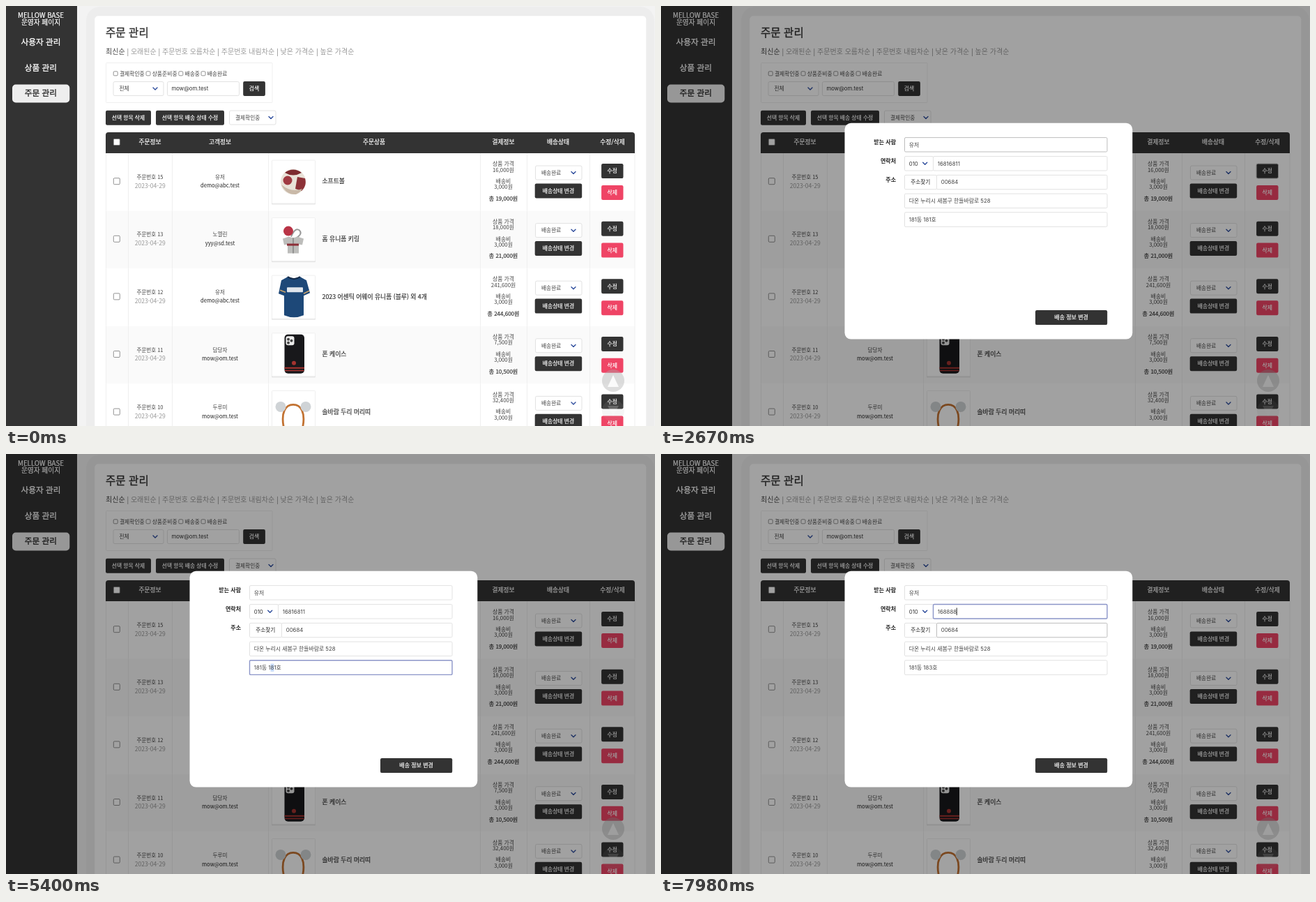
An HTML page that plays this animation: 931x602 px, repeating every 8 s.

```html
<!DOCTYPE html>
<html lang="ko">
<head>
<meta charset="utf-8">
<title>주문 관리</title>
<style>
html, body { margin: 0; width: 100%; height: 100%; overflow: hidden; background: #f3f3f3; }
svg { display: block; width: 931px; height: 602px; }
text { font-family: 'Noto Sans CJK KR', 'Noto Sans CJK', 'Noto Sans', sans-serif; white-space: pre; }
.ui { font-family: Inter, 'Noto Sans CJK KR', 'Noto Sans CJK', sans-serif; }
</style>
</head>
<body>
<svg id="stage" viewBox="0 0 931 602" xmlns="http://www.w3.org/2000/svg"></svg>
<script>
const DARK = '#333', LOOP = 8000;

// Markup helpers
const rect = (x, y, w, h, fill, r = 0, more = '') =>
  `<rect x="${x}" y="${y}" width="${w}" height="${h}" rx="${r}" fill="${fill}" ${more}/>`;
const line = c => `stroke="${c}" stroke-width="1"`;
const circle = (x, y, r, fill, more = '') =>
  `<circle cx="${x}" cy="${y}" r="${r}" fill="${fill}" ${more}/>`;
const path = (d, fill, more = '') => `<path d="${d}" fill="${fill}" ${more}/>`;
const group = (x, y, body, more = '') => `<g transform="translate(${x} ${y})" ${more}>${body}</g>`;

function text(x, y, size, str, { color = '#444', anchor = 'start', medium, bold, ui, id } = {}) {
  const weight = medium ? `stroke="${color}" stroke-width="${size * 0.024}"` : '';
  return `<text x="${x}" y="${y}" font-size="${size}" fill="${color}" text-anchor="${anchor}" ${weight}` +
    `${bold ? ' font-weight="700"' : ''}${ui ? ' class="ui"' : ''}${id ? ` id="${id}"` : ''}>${str}</text>`;
}
const mid = (x, y, size, str, opt = {}) => text(x, y, size, str, { anchor: 'middle', ...opt });
const chevron = (x, y) =>
  path(`M${x - 3} ${y - 1.4}l3 3l3 -3`, 'none', 'stroke="#2d4c9c" stroke-width="1.4" stroke-linecap="round" stroke-linejoin="round"');
const button = (x, y, w, str, { h = 21, size = 7.8, fill = DARK, id = '' } = {}) =>
  `<g id="${id}">` + rect(x, y, w, h, fill, 2.2) +
  mid(x + w / 2, y + h / 2 + 2.8, size, str, { color: '#fff', medium: true }) + '</g>';
const select = (x, y, w, str, { id = '', inset = 12 } = {}) =>
  rect(x, y, w, 20, '#fff', 2, line('#e2e2e2') + ` id="${id}"`) +
  text(x + 8.5, y + 12.8, 7.7, str) + chevron(x + w - inset, y + 10);
const check = (x, y, s) => rect(x - s / 2, y - s / 2, s, s, '#fff', 1.3, 'stroke="#777" stroke-width=".8"');

// Product pictures, drawn around their own centre
const pictures = [
  () => circle(0, 0, 18, '#e9e2d8') +
    path('M-12 -13a18 18 0 0 1 24 0q-12 7 -24 0z', '#7d2c30') +
    path('M6 -7l11 2a18 18 0 0 1 -5 18l-9 -3z', '#8d3238') +
    path('M-17 4q14 12 30 6a18 18 0 0 1 -9 8q-14 1 -21 -14z', '#c9b9a8') +
    circle(-8, -2, 6.5, '#a03a42'),
  () => path('M-3 -4q6 -14 12 -9q5 5 -5 11', 'none', 'stroke="#999" stroke-width="2"') +
    path('M-15 -1l9 -3q6 3 12 0l9 3l-2 9l-5 -1v13h-16v-13l-5 1z', '#bdbdbb') +
    path('M0 -2v22', 'none', 'stroke="#555" stroke-width=".8"') +
    rect(-9, 6, 17, 3, '#8d2f38') + circle(-7, -12, 7, '#b93446'),
  () => path('M-8 -29q9 4 18 0l9 5l5 18l-9 4v28q-14 6 -28 0v-28l-8 -3l4 -19z', '#1d4878') +
    path('M-8 -29q9 6 18 0', 'none', 'stroke="#142a48" stroke-width="2"') +
    path('M-19 -10l8 3M23 -9l-8 4', 'none', 'stroke="#c9a36c" stroke-width="1.6"') +
    rect(-9, -14, 23, 7, '#dfe5ec', 1),
  () => rect(-12.5, -29, 28.5, 56, '#18181b', 5) + rect(-10.5, -26.5, 12, 13, '#ececec', 3) +
    circle(-7, -22, 2, '#444') + circle(-7, -17, 2, '#444') + circle(-2.5, -20, 2, '#444') +
    rect(-12.5, 18, 28.5, 2, '#a5332f') + rect(-12, 22, 27.5, 1.5, '#a5332f') + circle(1, 12, 3, '#a5332f'),
  () => path('M-13.5 22C-18 0 -11 -11 0 -11S18 0 13.5 22', 'none', 'stroke="#c27232" stroke-width="2.8"') +
    circle(-18, -8, 7.5, '#cfd3d6') + circle(18, -8, 7.5, '#cfd3d6'),
];

const orders = [
  [15, '유저', 'demo@abc.test', '소프트볼', '16,000', '19,000'],
  [13, '노엘린', 'yyy@sd.test', '홈 유니폼 키링', '18,000', '21,000'],
  [12, '유저', 'demo@abc.test', '2023 어센틱 어웨이 유니폼 (블루) 외 4개', '241,600', '244,600'],
  [11, '담당자', 'mow@om.test', '폰 케이스', '7,500', '10,500'],
  [10, '두루미', 'mow@om.test', '솔바람 두리 머리띠', '32,400', '35,400'],
];

function row([no, user, mail, item, price, total], i) {
  const c = { color: '#444' }, d = { color: '#222' };
  return group(0, i * 82.6,
    rect(143, 211, 759, 82.6, i % 2 ? '#fafafa' : '#fff') +
    [143.5, 175.5, 238.5, 376.5, 680.5, 747.5, 837.5, 902].map(x => rect(x - 0.5, 211, 1, 82.6, '#efefef')).join('') +
    check(158.8, 251.2, 9) +
    mid(206.5, 247.9, 7.5, '주문번호 ' + no, c) + mid(206.8, 260.5, 8.6, '2023-04-29', { color: '#999' }) +
    mid(307, 247.9, 7.6, user, c) + mid(307, 260.2, 7.6, mail, d) +
    rect(381, 222.2, 63, 62.4, '#e3e3e3', 1) + rect(381.5, 221, 62, 62, '#fff', 1, line('#efefef')) +
    group(412, 252, pictures[i]()) +
    text(453.5, 254.4, 8.8, item, { color: DARK, medium: true }) +
    mid(713.5, 229.3, 7.8, '상품 가격', c) + mid(713.5, 237.6, 7.8, price + '원', c) +
    mid(713.5, 254, 7.8, '배송비', c) + mid(713.5, 262.3, 7.8, '3,000원', c) +
    mid(713.5, 278.8, 8, `총 ${total}원`, { color: DARK, medium: true }) +
    select(759.5, 229, 66.5, '배송완료', { id: 'status' + i }) + button(758.7, 254.4, 67.5, '배송상태 변경') +
    button(854.1, 226.1, 31.4, '수정', { id: 'edit' + i }) +
    button(854.1, 257, 31.4, '삭제', { fill: '#ef4465' }));
}

const sidebar = () => rect(0, 0, 102, 602, DARK) +
  mid(50, 17.2, 9.7, 'MELLOW BASE', { color: '#fff', medium: true }) +
  mid(50, 27.4, 9.7, '운영자 페이지', { color: '#fff', medium: true }) +
  mid(50, 56.2, 11.7, '사용자 관리', { color: '#fff', medium: true }) +
  mid(50, 92.5, 11.7, '상품 관리', { color: '#fff', medium: true }) +
  rect(9, 112.5, 82.3, 26, '#eee', 5) +
  mid(50, 128.8, 11.7, '주문 관리', { color: '#222', medium: true });

const sorts = ['오래된순', '주문번호 오름차순', '주문번호 내림차순', '낮은 가격순', '높은 가격순'];
const filters = [[157.2, '결제확인중'], [204, '상품준비중'], [250.8, '배송중'], [283, '배송완료']];
const heads = [[206.5, '주문정보'], [307, '고객정보'], [528, '주문상품'], [713.5, '결제정보'], [792, '배송상태'], [870, '수정/삭제']];

const page = () => rect(115, 1, 815, 640, '#ededed', 20) + rect(127.3, 14.3, 791, 620, '#fff', 5) +
  text(143, 43.8, 15.6, '주문 관리', { color: DARK, medium: true }) +
  text(143, 68.8, 10, '<tspan fill="#444">최신순</tspan>' +
    sorts.map(s => `<tspan fill="#777"> | </tspan>${s}`).join(''), { color: '#999' }) +
  rect(143.5, 81.5, 238.5, 57, '#fff', 1, line('#efefef')) +
  filters.map(([x, s]) => check(x, 96.8, 6) + text(x + 5.7, 99.6, 7.8, s)).join('') +
  select(154, 108.5, 72, '전체') +
  rect(231.5, 108.5, 103, 20, '#fff', 2, line('#e2e2e2')) +
  text(237.5, 121.3, 7.8, 'mow@om.test', { ui: true, color: DARK }) +
  button(340.2, 107.9, 31.7, '검색') +
  button(143, 149.7, 65, '선택 항목 삭제') + button(215, 149.7, 98, '선택 항목 배송 상태 수정') +
  select(320.5, 150, 66.5, '결제확인중', { inset: 7 }) +
  orders.map(row).join('') +
  path('M143 211v-26q0 -4 4 -4h751q4 0 4 4v26z', DARK) + check(158.8, 195, 9) +
  heads.map(([x, s]) => mid(x, 198.3, 8.7, s, { color: '#fff', medium: true })).join('') +
  circle(871, 537, 16, '#aaa', 'opacity=".4"') + path('M863 546l8 -17l8 17z', '#fff', 'opacity=".85"') +
  group(871, 580, circle(0, 0, 16, '#aaa', 'opacity=".12"') + path('M-8 -7h16l-8 15z', '#fff', 'opacity=".2"'));

// Form fields: x, y, height, placeholder, value
const fields = {
  name: [349.5, 188.6, 20.4, '받는 사람을 입력해 주세요.', '유저'],
  phone: [390.5, 215.5, 20.5, '나머지 번호를 입력해 주세요.', '16816811'],
  zip: [395.5, 242.4, 20.4, '우편번호', '00684'],
  addr: [349.5, 269.1, 20.5, '주소', '다온 누리시 새봄구 한들바람로 528'],
  detail: [349.5, 295.8, 20.6, '상세주소를 입력해 주세요.', '181동 181호'],
};

const field = ([key, [x, y, h]]) => rect(x, y, 640 - x, h, '#fff', 1.5, `id="box-${key}"`) +
  rect(0, y + 4.8, 0, 11.2, '#c6daf8', 0, `id="sel-${key}"`) +
  text(x + 6.2, y + h / 2 + 2.8, 7.85, '', { ui: true, id: 'val-' + key }) +
  rect(0, y + 5, 0.9, 10.6, '#111', 0, `id="caret-${key}"`);

const modal = () => rect(0, 0, 931, 602, '#000', 0, 'opacity=".37"') +
  rect(263.5, 167.8, 412.8, 309.8, '#fff', 9) +
  [['받는 사람', 198], ['연락처', 225], ['주소', 251.6]].map(([s, y]) =>
    text(337, y, 8, s, { anchor: 'end', bold: true, color: '#222' })).join('') +
  rect(349.5, 215.5, 41, 20.5, '#fff', 1.5, line('#e2e2e2')) +
  text(355.7, 228.5, 7.85, '010', { ui: true, color: DARK }) + chevron(378.7, 225.6) +
  rect(349.5, 242.4, 46, 20.4, '#fff', 1.5, line('#e2e2e2')) + mid(372.3, 255.1, 7.7, '주소찾기', { color: '#222' }) +
  Object.entries(fields).map(field).join('') +
  button(537, 436.1, 103.2, '배송 정보 변경', { size: 8 });

document.getElementById('stage').innerHTML =
  page() + sidebar() + `<g id="modal">${modal()}</g>`;

// Each step changes part of the state; caret and sel count characters
const start = { open: 0, filled: 0, status: 0, edit: 0, hover: '', focus: '', caret: -1, sel: null,
  phone: fields.phone[4], detail: fields.detail[4] };
const steps = [
  [0, {}],
  [1320, { status: 1 }], [1440, { status: 0 }], [1530, { edit: 1 }],
  [1890, { open: 1, edit: 2 }], [1920, { filled: 1 }],
  [2220, { hover: 'zip' }], [2310, { hover: '' }], [2400, { hover: 'phone' }],
  [2580, { hover: '' }], [2670, { hover: 'name' }],
  [3210, { hover: '' }], [3240, { hover: 'zip' }],
  [3450, { hover: '' }], [3540, { hover: 'addr' }],
  [3870, { focus: 'addr', edit: 0 }], [4260, { focus: '', hover: '' }],
  [4440, { hover: 'detail' }], [4560, { focus: 'detail', caret: 0 }],
  [5010, { caret: -1 }], [5220, { caret: 7 }], [5400, { caret: -1, sel: [6, 7] }],
  [5910, { detail: '181동 183호', sel: null, caret: 7 }],
  [5940, { hover: 'addr' }], [5970, { hover: 'zip' }], [6000, { hover: 'phone' }],
  [6150, { focus: 'phone', caret: 8 }], [6300, { caret: -1, sel: [0, 8] }],
  [6900, { phone: '1', sel: null, caret: 1 }], [7050, { phone: '16', caret: 2 }],
  [7260, { phone: '168', caret: 3 }], [7320, { phone: '1688', caret: 4 }],
  [7380, { phone: '16888', caret: 5 }], [7440, { phone: '168888', caret: 6 }],
  [7800, { hover: 'zip' }],
];

const el = id => document.getElementById(id);
const set = (node, attrs) => { for (const k in attrs) node.setAttribute(k, attrs[k]); };

function drawField(key, s) {
  const [x, , , hint, value] = fields[key];
  const focused = s.focus === key, typing = focused && key !== 'addr';
  const border = typing ? '#8b95c8' : focused ? '#84889c' : s.hover === key ? '#bdbdbd' : '#e2e2e2';
  set(el('box-' + key), { stroke: border, 'stroke-width': typing ? 1.4 : 1 });

  const label = el('val-' + key);
  label.textContent = s.filled ? s[key] || value : hint;
  set(label, { fill: s.filled ? '#444' : '#c6c6c6' });

  const at = n => x + 6.2 + (n ? label.getSubStringLength(0, n) : 0);
  const caretOn = focused && s.caret >= 0, selOn = focused && s.sel;
  set(el('caret-' + key), { x: caretOn ? at(s.caret) - 0.4 : 0, opacity: caretOn ? 1 : 0 });
  set(el('sel-' + key), selOn ? { x: at(s.sel[0]), width: at(s.sel[1]) - at(s.sel[0]) } : { width: 0 });
}

function draw(s) {
  set(el('modal'), { visibility: s.open ? 'visible' : 'hidden' });
  set(el('status0'), { stroke: s.status ? '#b4b4b4' : '#e2e2e2' });
  set(el('edit0').firstChild, {
    fill: s.edit === 1 ? '#262626' : DARK,
    stroke: s.edit === 2 ? '#bbb' : 'none',
  });
  set(el('edit0').lastChild, { 'stroke-width': s.edit === 1 ? 0.45 : 0.19 });
  Object.keys(fields).forEach(key => drawField(key, s));
}

let shown = -1;
function tick() {
  const t = performance.now() % LOOP;
  const n = steps.filter(([at]) => at <= t).length;
  if (n !== shown) {
    shown = n;
    draw(Object.assign({}, start, ...steps.slice(0, n).map(([, change]) => change)));
  }
  requestAnimationFrame(tick);
}
tick();
</script>
</body>
</html>
```
